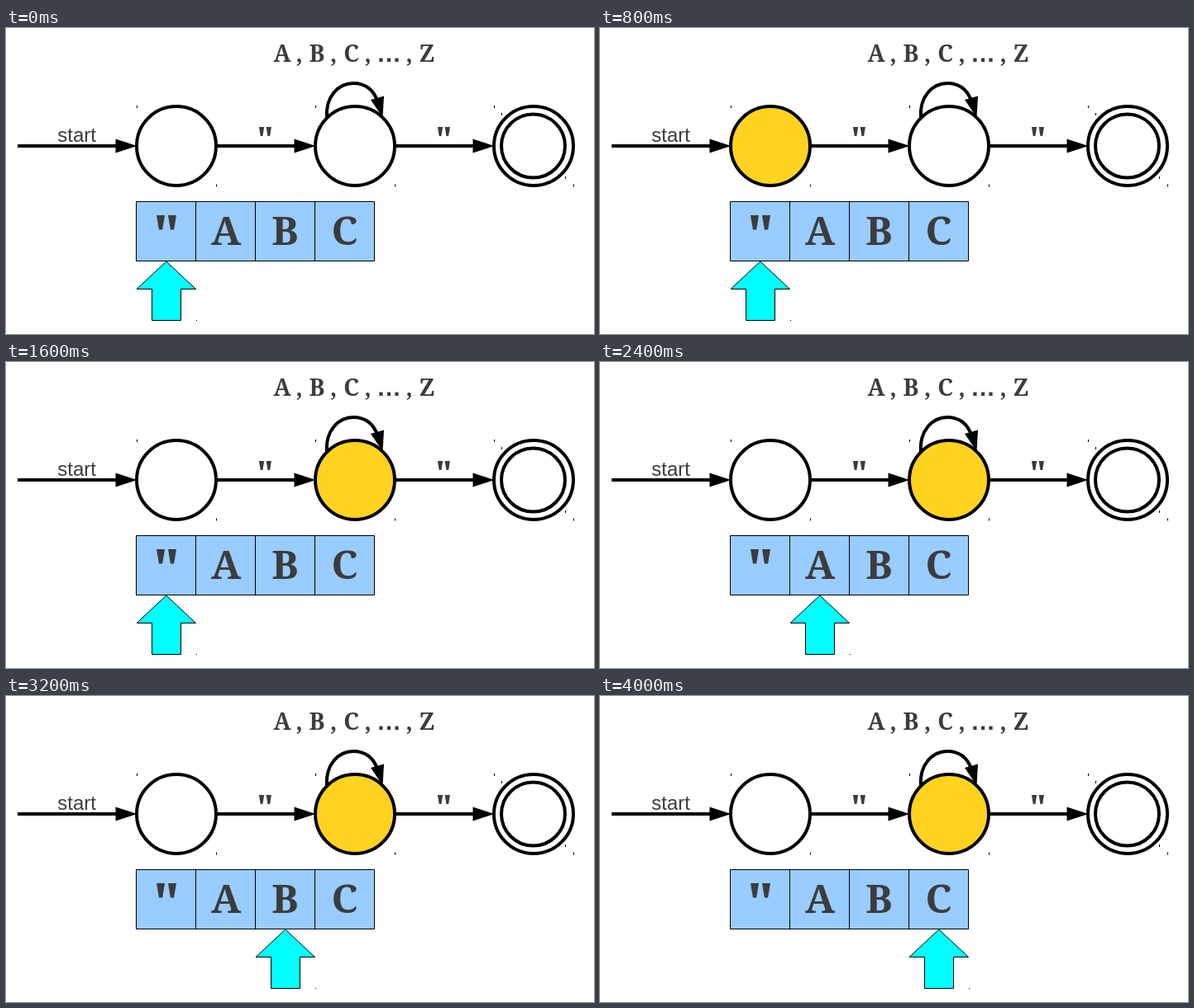
Animation of 711x371 px, one loop 4.8 s. Source, as an HTML page:

```html
<!DOCTYPE html>
<html lang="en">
<head>
<meta charset="utf-8">
<title>State machine reading a string</title>
<style>
  html, body { margin: 0; width: 100%; height: 100%; overflow: hidden; background: #fff; }
  svg { display: block; width: 711px; height: 371px; }
  text { fill: #3c3c3c; text-anchor: middle; font: bold 28px "Noto Serif", serif; }
  .start { font: 24px "Liberation Sans", Arial, sans-serif; }
  .dots { font: bold 30px "Liberation Sans", Arial, sans-serif; }
  .tape text { font-size: 48px; }
  .tape .quote { font-size: 64px; }
  .quote { font-size: 40px; }
  .line { fill: none; stroke: #000; stroke-width: 4; }
  .state { fill: #fff; stroke: #000; stroke-width: 4; }
  .tape rect { fill: #9cf; stroke: #000; }
  .pointer path { fill: #0ff; stroke: #000; }

  .first { animation: first 4.8s step-end infinite; }
  .second { animation: second 4.8s step-end infinite; }
  .pointer { animation: read 4.8s step-end infinite; }
  @keyframes first {
    0%, 33.333% { fill: #fff; }
    16.666% { fill: #ffd320; }
  }
  @keyframes second {
    0% { fill: #fff; }
    33.333%, 100% { fill: #ffd320; }
  }
  @keyframes read {
    0% { transform: translateX(0); }
    50% { transform: translateX(72px); }
    66.666% { transform: translateX(144px); }
    83.333%, 100% { transform: translateX(216px); }
  }
</style>
</head>
<body>
<svg viewBox="0 0 711 371">
  <defs>
    <path id="head" d="M0 0L-26-8.5V8.5Z"/>
    <path id="tick" d="M0-1.5V1.5" stroke="#000"/>
    <rect id="cell" width="72" height="72"/>
  </defs>

  <path class="line" d="M14 143H136M254 143H352M470 143H568"/>
  <use href="#head" x="158.500" y="143"/>
  <use href="#head" x="374.500" y="143"/>
  <use href="#head" x="590.500" y="143"/>

  <circle class="state first" cx="206" cy="143" r="48"/>
  <circle class="state second" cx="422" cy="143" r="48"/>
  <circle class="state" cx="638" cy="143" r="48"/>
  <circle class="state" cx="637.500" cy="143" r="38.500"/>

  <path class="line" d="M388 109C386 83 402 67 420 67C434 67 444 75 449 88"/>
  <path d="M455.500 108.500L441 87L457 82.500Z"/>

  <use href="#tick" x="158.500" y="95.500"/>
  <use href="#tick" x="254.500" y="191"/>
  <use href="#tick" x="374.500" y="95.500"/>
  <use href="#tick" x="470.500" y="191"/>
  <use href="#tick" x="590.500" y="95.500"/>
  <use href="#tick" x="686.500" y="191"/>
  <use href="#tick" x="599.500" y="104.500"/>
  <use href="#tick" x="676.500" y="181.500"/>

  <text class="start" x="85.700" y="138">start</text>
  <text class="quote" x="313.500" y="148.500">"</text>
  <text class="quote" x="529.500" y="148.500">"</text>
  <text y="40.500"><tspan x="334">A</tspan><tspan x="354.500">,</tspan><tspan x="376">B</tspan><tspan x="396">,</tspan><tspan x="417.500">C</tspan><tspan x="437.500">,</tspan><tspan class="dots" x="463">…</tspan><tspan x="487.500">,</tspan><tspan x="509">Z</tspan></text>

  <g class="tape">
    <use href="#cell" x="157.500" y="210.500"/>
    <use href="#cell" x="229.500" y="210.500"/>
    <use href="#cell" x="301.500" y="210.500"/>
    <use href="#cell" x="373.500" y="210.500"/>
    <g fill="#9cf" stroke="#000">
      <path d="M157.500 210.500H445.500V282.500H157.500ZM229.500 210.500V282.500M301.500 210.500V282.500M373.500 210.500V282.500"/>
    </g>
    <text class="quote" x="194" y="273">"</text>
    <text x="266" y="263">A</text>
    <text x="337.500" y="263">B</text>
    <text x="409.500" y="263">C</text>
  </g>

  <g class="pointer">
    <path d="M193.800 283L229.500 316.500H211.500V354.500H176.500V316.500H158Z"/>
    <rect x="230" y="354" width="1" height="1"/>
  </g>
</svg>
</body>
</html>
```
